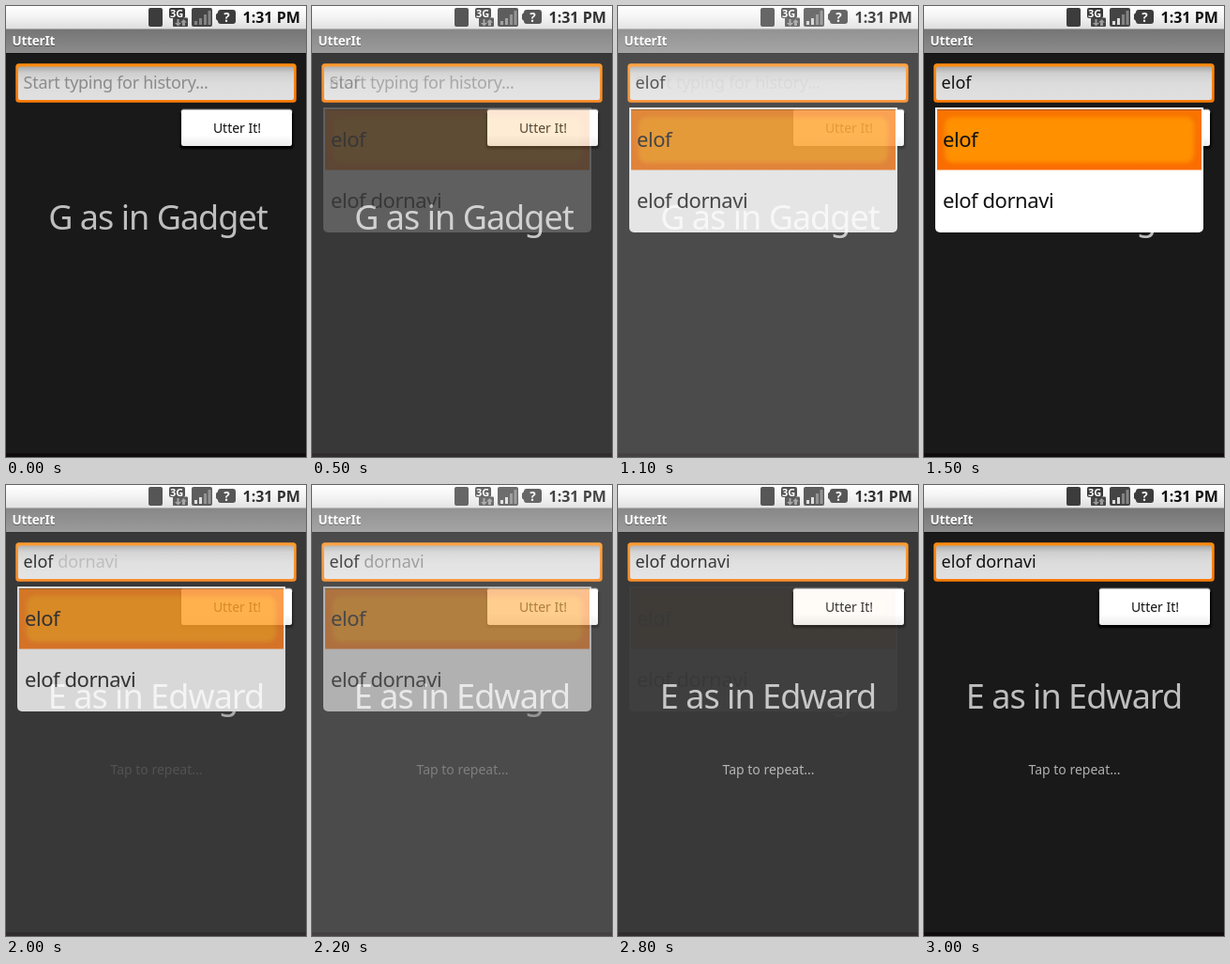
These frames come from a looping animation (320x480 px, 3500 ms). An HTML page:

```html
<!DOCTYPE html>
<html lang="en">
<head>
<meta charset="utf-8">
<title>UtterIt</title>
<style>
  html, body { margin: 0; width: 100%; height: 100%; overflow: hidden; background: #fff; }
  svg { display: block; }
  text { font-family: "Noto Sans", "Open Sans", sans-serif; }
  .bold { font-weight: 700; }
  .field { font-size: 18px; fill: #111; }
  .hint { fill: #8b8b8b; letter-spacing: -.016em; }
  .item { font-size: 22px; letter-spacing: -.02em; fill: #111; }
  .big { font-size: 36px; letter-spacing: -.027em; fill: #bebebe; }
  .small { font-size: 14px; }
  .mid { text-anchor: middle; }

  /* Six-step cross-fades at 500 ms and 2000 ms over a white backing. */
  .scene, .back { animation: 3500ms infinite; }
  .start { animation-name: start; }
  .list { animation-name: list; }
  .result { animation-name: result; }
  .back { fill: #fff; animation-name: back; animation-timing-function: step-end; }
  @keyframes start {
    0% { opacity: 1; }
    14.285% { opacity: 1; animation-timing-function: steps(6, start); }
    48.571%, 100% { opacity: 0; }
  }
  @keyframes list {
    0% { opacity: 0; }
    14.285% { opacity: 0; animation-timing-function: steps(6, start); }
    48.571% { opacity: 1; }
    57.142% { opacity: 1; animation-timing-function: steps(6, start); }
    91.428%, 100% { opacity: 0; }
  }
  @keyframes result {
    0% { opacity: 0; }
    57.142% { opacity: 0; animation-timing-function: steps(6, start); }
    91.428%, 100% { opacity: 1; }
  }
  @keyframes back {
    0%, 31.428%, 74.285%, 100% { fill: #fff; }
    25.714%, 68.571% { fill: #e5e5e5; }
  }
</style>
</head>
<body>
<svg width="320" height="480" viewBox="0 0 320 480">
  <defs>
    <linearGradient id="statusFill" x2="0" y2="1">
      <stop stop-color="#fff"/><stop offset=".45" stop-color="#f4f4f4"/><stop offset="1" stop-color="#dcdcdc"/>
    </linearGradient>
    <linearGradient id="titleFill" x2="0" y2="1">
      <stop stop-color="#757575"/><stop offset="1" stop-color="#8c8c8c"/>
    </linearGradient>
    <linearGradient id="fieldFill" x2="0" y2="1">
      <stop stop-color="#a9a9a9"/><stop offset=".2" stop-color="#cfcfcf"/>
      <stop offset=".5" stop-color="#dcdcdc"/><stop offset="1" stop-color="#e0e0e0"/>
    </linearGradient>
    <linearGradient id="edgeFill" x2="0" y2="1">
      <stop stop-color="#ff8c10"/><stop offset="1" stop-color="#f77a08"/>
    </linearGradient>
    <linearGradient id="buttonFill" x2="0" y2="1">
      <stop offset=".7" stop-color="#fff"/><stop offset="1" stop-color="#ececec"/>
    </linearGradient>
    <linearGradient id="itemFill" x2="0" y2="1">
      <stop stop-color="#f87400"/><stop offset="1" stop-color="#fa6c00"/>
    </linearGradient>
    <filter id="soft"><feGaussianBlur stdDeviation="2"/></filter>
    <filter id="shade"><feGaussianBlur stdDeviation="1"/></filter>

    <g id="icons">
      <rect x="152" y="2" width="15" height="20" rx="2" fill="#3c3c3c"/>
      <rect x="174" y="2" width="17" height="11" rx="2" fill="#383838"/>
      <text class="bold" x="175" y="11.5" font-size="11" fill="#fff">3G</text>
      <rect x="178" y="12.500" width="16" height="9.500" rx="1" fill="#444"/>
      <path d="M182.500 14v4h-2.500l3.500 3.500 3.500-3.500h-2.500v-4zM188 21v-3.500h-2l3.500-3.500 3.500 3.500h-2v3.500z" fill="#999"/>
      <rect x="198" y="2" width="22" height="20" rx="2" fill="#444"/>
      <path d="M201 20v-4h3v4zM206 20v-7h3v7zM211 20v-11h3v11zM215.500 20v-15h3v15z" fill="#838383"/>
      <path d="M229 4h13a3 3 0 0 1 3 3v9a3 3 0 0 1-3 3h-13a3 3 0 0 1-3-3l-2-2v-5l2-2a3 3 0 0 1 3-3z" fill="#3c3c3c"/>
      <text class="bold mid" x="235.500" y="16.500" font-size="13.500" fill="#fff">?</text>
      <text class="bold" x="252.500" y="18" font-size="16" fill="#111">1:31 PM</text>
    </g>

    <path id="bars" d="M201 20v-4h3v4zM206 20v-7h3v7z" fill="#ddd"/>

    <g id="base">
      <rect width="320" height="480" fill="#191919"/>
      <rect y="476" width="320" height="4" fill="#100c0e"/>
      <rect width="320" height="25" fill="url(#statusFill)"/>
      <use href="#icons"/>
      <rect y="25" width="320" height="25" fill="url(#titleFill)"/>
      <rect y="24" width="320" height="1" fill="#a5a5a5"/>
      <rect y="50" width="320" height="1" fill="#101010"/>
      <g class="bold" font-size="13.5" letter-spacing="-.2">
        <text x="6.500" y="43" fill="#444">UtterIt</text>
        <text x="6.500" y="42" fill="#fff">UtterIt</text>
      </g>
      <rect x="10.300" y="61.300" width="299.400" height="41.400" rx="3.500" fill="url(#edgeFill)"/>
      <rect x="13" y="64.500" width="294" height="35.500" rx="2" fill="url(#fieldFill)"/>
      <rect x="185.500" y="111" width="121" height="41" rx="3" fill="#060606" filter="url(#shade)"/>
      <rect x="186.500" y="109.500" width="119" height="6" rx="3" fill="#777"/>
      <rect x="187" y="110.500" width="118" height="38.500" rx="2.500" fill="url(#buttonFill)"/>
      <text class="small mid" x="246.500" y="135" fill="#111">Utter It!</text>
    </g>

    <text id="word" class="big mid" x="162" y="238">G as in Gadget</text>
  </defs>

  <rect width="320" height="480" fill="#fff"/>
  <rect class="back" y="50" width="320" height="430"/>

  <g class="scene start">
    <use href="#base"/>
    <text class="field hint" x="18.600" y="88">Start typing for history...</text>
    <use href="#word"/>
  </g>

  <g class="scene list">
    <use href="#base"/>
    <use href="#bars"/>
    <text class="field" x="18.600" y="88">elof</text>
    <use href="#word"/>
    <path d="M12 108h286v128a5 5 0 0 1-5 5h-276a5 5 0 0 1-5-5z" fill="#fff"/>
    <rect x="14" y="110" width="282" height="64.500" fill="url(#itemFill)"/>
    <rect x="22" y="118" width="266" height="49" rx="9" fill="#ff9000" filter="url(#soft)"/>
    <rect x="14" y="110" width="282" height="1" fill="#a85400"/>
    <text class="item" x="20" y="150">elof</text>
    <text class="item" x="20" y="215">elof dornavi</text>
  </g>

  <g class="scene result">
    <use href="#base"/>
    <use href="#bars"/>
    <text class="field" x="18.600" y="88">elof dornavi</text>
    <text class="big mid" x="160" y="238">E as in Edward</text>
    <text class="small mid" x="160.500" y="308" fill="#b0b0b0">Tap to repeat...</text>
  </g>
</svg>
</body>
</html>
```
